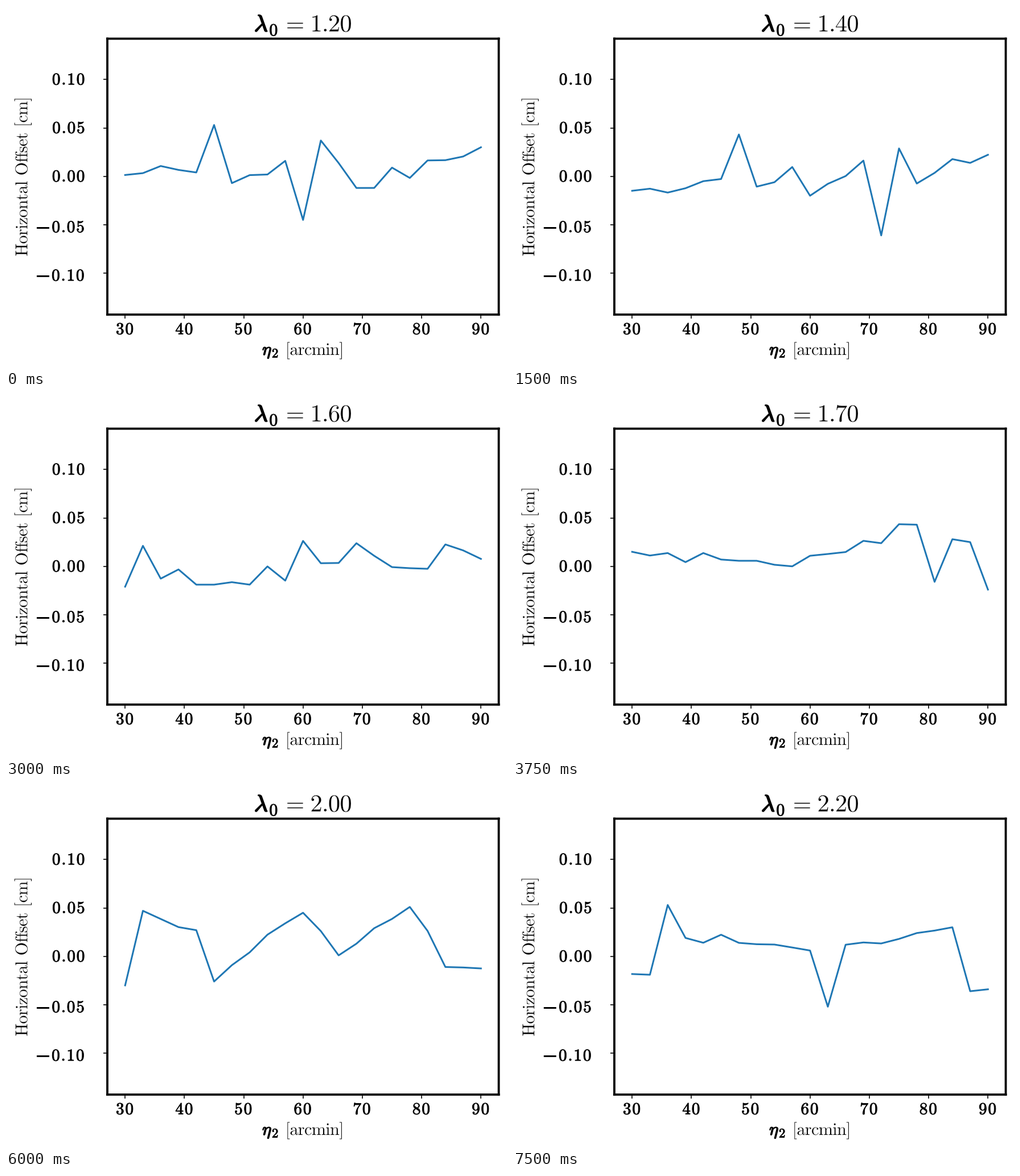
Animation, 880 px wide and 637 px high, one loop 8 s. Source, as a matplotlib script:

```python
import numpy as np
import matplotlib.pyplot as plt
from matplotlib.animation import FuncAnimation
from matplotlib.patches import PathPatch, Rectangle
from matplotlib.textpath import TextPath
from matplotlib.transforms import Affine2D, IdentityTransform

W, H = 880, 637
PT = 0.72  # points per pixel at 100 dpi
plt.rcParams["mathtext.fontset"] = "cm"

fig = plt.figure(figsize=(W / 100, H / 100), dpi=100, facecolor="white")


def glyphs(chars, size, font="mathrm", gap=-0.027):
    """Letter-spaced math text as a path; size is the em in pixels."""
    body = ""
    for c in chars:
        space = gap
        if c == ".":
            space -= 0.2  # cancels the space mathtext adds after a dot
        elif c == " ":
            c, space = "", 0.38
        body += c + r"\hspace{%.3f}" % space
    return TextPath((0, 0), rf"$\{font}{{{body}}}$", size=size)


def place(path, x, y, align=0.5, turn=0):
    """Move a path so its ink is aligned on x and its baseline lies on y."""
    box = path.get_extents()
    move = Affine2D().translate(-(box.x0 + align * box.width), 0)
    return move.rotate_deg(turn).translate(x, H - y).transform_path(path)


def draw(path, stroke=0.0, color="black"):
    patch = PathPatch(path, facecolor="black", edgecolor=color,
                      linewidth=stroke * PT, transform=IdentityTransform())
    return fig.add_artist(patch)


def light(path):
    return draw(path, 0.25, "white")


def bold(text, size, x, y, align=0.5):
    return draw(place(glyphs(text, size, "mathbf", 0.07), x, y, align), 0.9)


def greek(name, size, x, y, stroke):
    return draw(place(glyphs([name], size, "mathit"), x, y, 0), stroke)


# Curves: offsets in 1e-3 cm over eta
eta = np.linspace(30, 90, 21)
rng = np.random.default_rng(4)


def trace(peaks):
    """Lines through the main peaks, with small jitter on the points between."""
    x = list(peaks)
    jitter = rng.normal(0, 4, eta.size) * ~np.isin(eta, x)
    return np.interp(eta, x, list(peaks.values())) + jitter


def noise(low):
    """A purely random curve whose lowest point is low."""
    y = np.maximum(rng.normal(0, 21, eta.size), 0.9 * low)
    y[y.argmin()] = low
    return y


# One curve per step of lambda, from 1.2 to 2.2
curves = [
    trace({42: 4, 45: 53, 48: -7, 57: 16, 60: -45, 63: 37, 69: -12, 90: 30}),
    trace({30: 17, 39: -32, 48: -10, 51: 35, 57: 39, 72: -37, 87: 3, 90: 42}),
    noise(-61),
    trace({36: -31, 42: 24, 45: -25, 60: -34, 66: 7, 72: -32, 78: -4, 81: -43}),
    noise(-21),
    trace({30: 15, 57: 0, 78: 43, 81: -16, 84: 28, 87: 25, 90: -24}),
    noise(-22),
    trace({30: -9, 36: 25, 39: -22, 51: -21, 57: 36, 63: -26, 90: -12}),
    trace({30: -30, 33: 47, 42: 27, 45: -26, 60: 45, 66: 1, 78: 51, 84: -11}),
    noise(-27),
    trace({33: -19, 36: 53, 39: 19, 60: 6, 63: -52, 66: 12, 84: 30, 87: -36}),
]

# Axes
left, right, top, bottom = 178, 865.5, 57.5, 543
ax = fig.add_axes([left / W, 1 - bottom / H,
                   (right - left) / W, (bottom - top) / H])
ax.set(xlim=(27, 93), ylim=(-142.7, 142.1),
       xticks=range(30, 91, 10), yticks=range(-100, 101, 50))
ax.tick_params(length=7 * PT, width=1.6 * PT,
               labelleft=False, labelbottom=False)
for spine in ax.spines.values():
    spine.set(linewidth=3.8 * PT, snap=False)
line, = ax.plot([], [], color="#1f77b4", linewidth=3 * PT)

# Tick labels
for i in range(7):
    bold(str(30 + 10 * i), 29.3, 208.5 + 104.17 * i, 577.5)
for i in range(5):
    value = 0.1 - 0.05 * i
    negative = i > 2
    base = 138.3 + 85.25 * i + 4 * negative
    bold(f"{abs(value):.2f}", 29.3, 137.2 - 0.8 * negative, base, 1)
    if negative:
        fig.add_artist(Rectangle((53.5, H - base + 6), 22, 3, color="black",
                                 linewidth=0, transform=IdentityTransform()))

# Axis labels
light(place(glyphs("Horizontal Offset [cm]", 30.4), 37.5, 301.5, turn=90))
light(place(glyphs("[arcmin]", 30.4), 590, 614, 1))
greek(r"\eta", 30.5, 451, 614, 1.5)
bold("2", 23, 468, 618.5, 0)

# Title
greek(r"\lambda", 41, 438, 44.5, 2)
bold("0", 30, 463.5, 52, 0)
light(place(glyphs("=", 42), 494, 45, 0))


def title_path(k):
    return place(glyphs(f"{1.2 + 0.1 * k:.2f}", 43), 606, 45, 1)


title = light(title_path(0))


def update(frame):
    k = frame // 3  # each curve holds for 750 ms
    line.set_data(eta, curves[k])
    title.set_path(title_path(k))
    return line, title


anim = FuncAnimation(fig, update, frames=32, interval=250,
                     repeat=True, repeat_delay=0)
plt.show()
```
